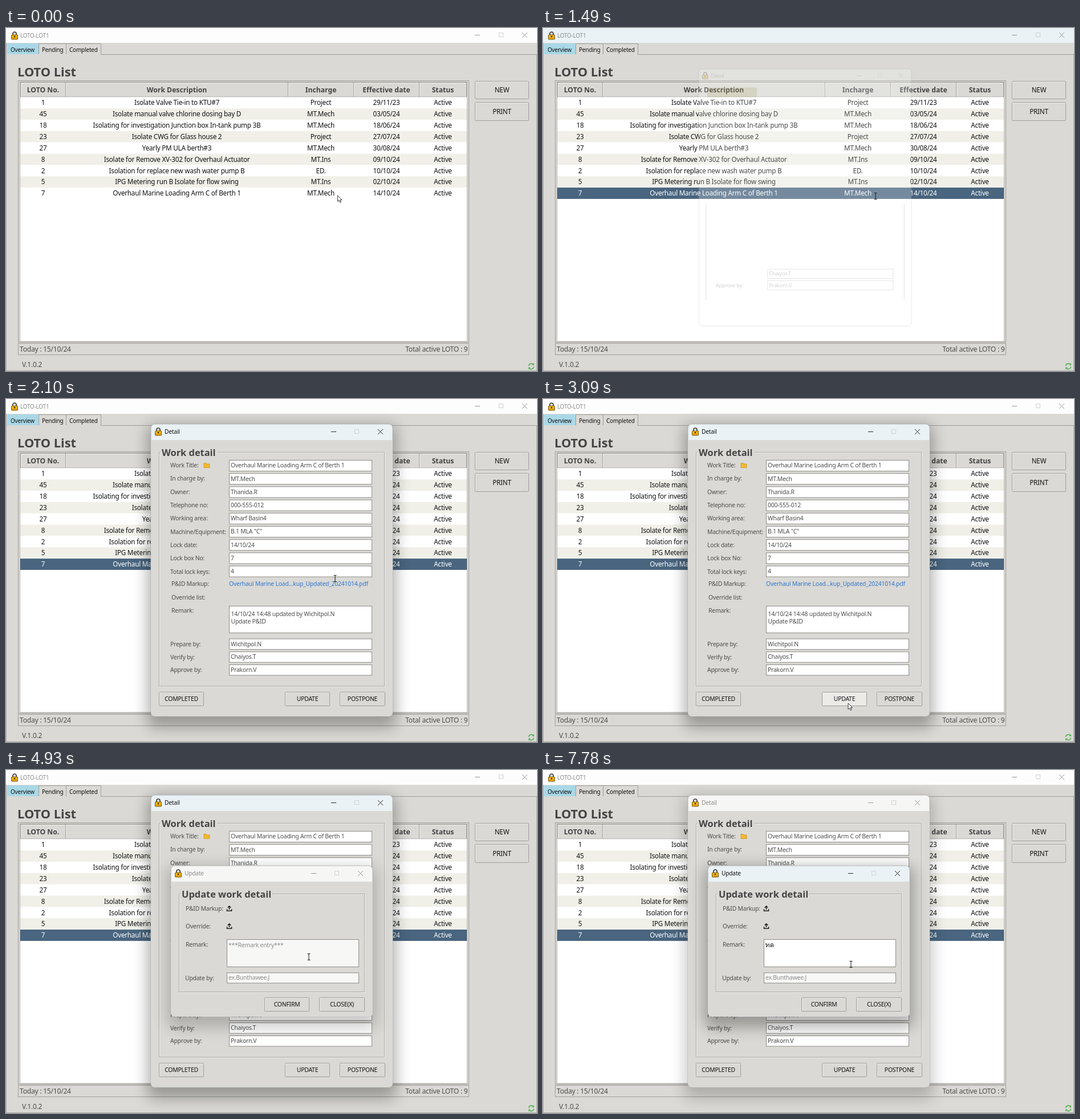
Write an HTML page that moves like this. It is 931 px wide and 602 px high and loops after 8 s.

```html
<!DOCTYPE html>
<html lang="en">
<head>
<meta charset="utf-8">
<title>LOTO list</title>
<style>
html, body { margin: 0; width: 100%; height: 100%; overflow: hidden; background: #dad9d5; }
svg { display: block; width: 931px; height: 602px; }
text { font-family: "Noto Sans", "Open Sans", sans-serif; letter-spacing: -.02em; white-space: pre; }
.bold { font-weight: 700; letter-spacing: 0; }
.mid { text-anchor: middle; }
.end { text-anchor: end; }
.blur { filter: blur(13px); }
</style>
</head>
<body>
<svg id="stage" viewBox="0 0 931 602" xmlns="http://www.w3.org/2000/svg"></svg>
<script>
const FACE = '#dad9d5', EDGE = '#9f9e99', INK = '#111', GREY = '#8c8c8c', BLUE = '#eaf2f6', WHITE = '#fdfdfd', PALE = '#f6f6f5';
const LOOP = 8000, SMALL = 10.4, ROW = 11.7;

const text = (x, y, s, size = SMALL, fill = '#4c4c4c', cls = '') =>
  `<text x="${x}" y="${y}" font-size="${size}" fill="${fill}" class="${cls}">${s.replace(/&/g, '&amp;')}</text>`;
const rect = (x, y, w, h, fill, stroke = 'none', extra = '') =>
  `<rect x="${x}" y="${y}" width="${w}" height="${h}" fill="${fill}" stroke="${stroke}" ${extra}/>`;
const path = (d, stroke, width = 1, extra = '') =>
  `<path d="${d}" fill="none" stroke="${stroke}" stroke-width="${width}" ${extra}/>`;

const button = (x, y, w, h, label, size = SMALL, id = '') =>
  rect(x + .5, y + .5, w - 1, h - 1, FACE, EDGE, `rx="1" ${id && `id="${id}"`}`) +
  path(`M${x + 1.5} ${y + h - 2}V${y + 1.5}H${x + w - 2}`, '#ecebe8') +
  text(x + w / 2, y + h / 2 + size * .37, label, size, INK, 'mid');

const field = (x, y, w, h, value = '', fill = '#fff', ink = '#4c4c4c') =>
  rect(x + .5, y + .5, w - 1, h - 1, fill, '#8d8c88') +
  (value && text(x + 3, y + h / 2 + 3.4, value, SMALL, ink));

const groupBox = (x, y, w, h, title, gap) => {
  const frame = `M${x + 2} ${y}H${x}V${y + h}H${x + w}V${y}H${x + gap}`;
  return path(frame, '#f0efec', 1, 'transform="translate(1 1)"') + path(frame, '#abaaa5') +
    text(x + 4.5, y + 6, title, 16.4, '#444', 'bold');
};

const lock = (x, y) =>
  path(`M${x - 3} ${y}v-3a3 3 0 0 1 6 0v3`, '#3c3a35', 1.7) +
  rect(x - 5.5, y - 1, 11, 8, '#f5b50a', '#4a3a0c', 'stroke-width=".8" rx="1"') +
  rect(x - 5, y + 4, 10, 1.4, '#d98f06') +
  `<circle cx="${x}" cy="${y + 2}" r="1.3" fill="#2d2408"/>`;

const controls = (xMin, xMax, xClose, y, name) =>
  path(`M${xMin} ${y + .5}h9M${xClose} ${y - 4}l9 9m0 -9l-9 9`, GREY, .9, `id="${name}Controls"`) +
  rect(xMax + .5, y - 3.5, 7, 7, 'none', '#cfd3d4');

const upload = (x, y) =>
  path(`M${x} ${y + 2}v-6m-2.7 2.6l2.7 -2.7l2.7 2.7M${x - 4} ${y + 1}v3.2h8v-3.2`, '#222', 1.5);

// Main window
const columns = [[25, 79, 'LOTO No.'], [104, 390, 'Work Description'], [494, 115, 'Incharge'], [609, 115, 'Effective date'], [724, 83, 'Status']];
const jobs = [
  '1|Isolate Valve Tie-in to KTU#7|Project|29/11/23',
  '45|Isolate manual valve chlorine dosing bay D|MT.Mech|03/05/24',
  '18|Isolating for investigation Junction box In-tank pump 3B|MT.Mech|18/06/24',
  '23|Isolate CWG for Glass house 2|Project|27/07/24',
  '27|Yearly PM ULA berth#3|MT.Mech|30/08/24',
  '8|Isolate for Remove XV-302 for Overhaul Actuator|MT.Ins|09/10/24',
  '2|Isolation for replace new wash water pump B|ED.|10/10/24',
  '5|IPG Metering run B Isolate for flow swing|MT.Ins|02/10/24',
  '7|Overhaul Marine Loading Arm C of Berth 1|MT.Mech|14/10/24'
];

const tableRow = (job, i) => {
  const y = 121.3 + i * 19.85, last = i === jobs.length - 1;
  const cells = [...job.split('|'), 'Active'].map((s, c) =>
    text(columns[c][0] + columns[c][1] / 2 + .5, y + 14.1, s, ROW, 'currentColor', 'mid')).join('');
  return `<g ${last ? 'id="pickedRow"' : ''} color="${INK}">` +
    rect(25, y, 783, 19.85, i % 2 ? '#f0f0e9' : '#fff', 'none', last ? 'id="pickedFill"' : '') +
    cells + '</g>';
};

const mainWindow = () =>
  rect(0, 0, 931, 602, FACE) +
  rect(0, 0, 931, 26, WHITE, 'none', 'id="mainBar"') +
  lock(15, 13) + text(25, 17, 'LOTO-LOT1', 9.9, GREY, 'mainTitle') + controls(822, 864, 905, 12, 'main') +
  path('M.5 26V602M930.5 46V602M0 601.5H931', '#aaa9a6') +
  rect(2, 27, 55, 19, '#a9d8e7') +
  path('M57.5 46V27.5H105.5V46M105.5 27.5H166.5V46M166 46.5H931', EDGE) +
  text(8, 41.5, 'Overview', 10, INK) + text(63, 41.5, 'Pending', 10, INK) + text(111, 41.5, 'Completed', 10, INK) +
  text(20, 85, 'LOTO List', 21.8, '#444', 'bold') +
  rect(21.5, 92.5, 790, 459, FACE, EDGE) +
  rect(24.5, 94.5, 784, 455.5, '#fff', '#b5b4af') +
  columns.map(([x, w, name]) =>
    rect(x + .5, 95.5, w, 25.5, FACE, EDGE) + path(`M${x + 1.5} 120V96.5H${x + w - 1}`, '#f1f0ed') +
    text(x + w / 2 + .5, 112.5, name, 12.2, '#444', 'bold mid')).join('') +
  jobs.map(tableRow).join('') +
  rect(21.5, 553.5, 790, 20, FACE, EDGE) +
  text(24, 568, 'Today : 15/10/24', 12.1) + text(809.5, 568, 'Total active LOTO : 9', 12.1, '#4c4c4c', 'end') +
  text(28, 595, 'V.1.0.2', 12) +
  button(822, 93, 95, 32, 'NEW', ROW) + button(822, 130, 95, 33, 'PRINT', ROW) +
  path('M916.5 593a4.6 4.6 0 0 1 8 -2.5M925.5 594.5a4.6 4.6 0 0 1 -8 2.5', '#58b559', 1.7) +
  '<path d="M926 588v4h-4zM916 599.5v-4h4z" fill="#58b559"/>';

// Dialog shell: shadow, title bar, body, plus a blank version used while opening
const dialog = (name, title, x, y, w, h, content, blank) => {
  const head = (key, ink) => lock(x + 13, y + 13) + text(x + 24, y + 17.3, title, 10.2, ink, key + 'Title') +
    controls(x + w - 108, x + w - 67, x + w - 26, y + 13, key);
  return `<g id="${name}">
    <g id="${name}Full">
      ${rect(x - 6, y + 2, w + 12, h + 17, '#000', 'none', `rx="12" class="blur" id="${name}Shadow"`)}
      ${rect(x, y, w, h, PALE, '#aaa9a5', `rx="7" stroke-width=".8" id="${name}Bar"`)}
      <path d="M${x + .4} ${y + 28}h${w - .8}v${h - 35}q0 6.6 -6.6 6.6h${14 - w}q-6.6 0 -6.6 -6.6z" fill="${FACE}"/>
      ${head(name, INK)}${content}
    </g>
    <g id="${name}Blank" opacity=".24">
      ${rect(x, y, w, h, '#fff', '#999', 'rx="7"')}${head(name + 'Pre', GREY)}${blank}
    </g></g>`;
};

const details = [
  ['Work Title:', 'Overhaul Marine Loading Arm C of Berth 1'], ['In charge by:', 'MT.Mech'], ['Owner:', 'Thanida.R'],
  ['Telephone no:', '000-555-012'], ['Working area:', 'Wharf Basin4'], ['Machine/Equipment:', 'B.1 MLA "C"'],
  ['Lock date:', '14/10/24'], ['Lock box No:', '7'], ['Total lock keys:', '4']
];
const signers = [['Prepare by:', 'Wichitpol.N'], ['Verify by:', 'Chaiyos.T'], ['Approve by:', 'Prakorn.V']];
const signRow = ([label, value], i) =>
  text(288, 434 + i * 22.7, label) + field(391, 420.5 + i * 22.7, 251, 19.5, value);

const detailContent =
  groupBox(268.5, 93.5, 395, 410.5, 'Work detail', 102) +
  details.map(([label, value], i) =>
    text(288, 120 + i * 23.35, label) + field(391, 107 + i * 23.2, 251, 20, value)).join('') +
  '<path d="M347 112.5h4l1 1.5h5v6.5h-10z" fill="#f2b92c" stroke="#c98d12" stroke-width=".7"/>' +
  text(290, 328, 'P&ID Markup:') + text(391, 328, 'Overhaul Marine Load...kup_Updated_20241014.pdf', SMALL, '#2f76cf') +
  text(290, 352, 'Override list:') + text(290, 375, 'Remark:') +
  field(391, 363, 251, 48) + text(394.5, 380.5, '14/10/24 14:48 updated by Wichitpol.N') + text(394.5, 393.5, 'Update P&ID') +
  signers.map(signRow).join('') +
  button(268, 514, 79, 25, 'COMPLETED') + button(489, 514, 79, 25, 'UPDATE', SMALL, 'updateButton') + button(585, 514, 80, 25, 'POSTPONE');

const detailBlank =
  rect(271, 81, 99, 19, '#c9c184') + path('M268.5 314V504M663.5 314V504', '#777') +
  field(391, 443, 251, 19.5, signers[1][1]) + signRow(signers[2], 2);

const updateContent =
  groupBox(303.5, 217.5, 325, 172, 'Update work detail', 163) +
  text(315, 247, 'P&ID Markup:') + upload(391.5, 243) +
  text(315, 278, 'Override:') + upload(391.5, 274) +
  text(315, 309.5, 'Remark:') + text(314, 369, 'Update by:') +
  rect(387.5, 297.5, 231, 48, '#f7f7f6', '#8d8c88', 'id="remarkBox"') +
  text(390, 310.5, '***Remark entry***', SMALL, GREY, 'hint') +
  `<text id="typed" x="390" y="310.5" font-size="${SMALL}" fill="${INK}"></text>` +
  path('M390.5 300.5V313', INK, 1, 'id="caret"') +
  path('M392 305.4a.8 .8 0 1 0 -.8 .8M392 305V311L394.6 306Q396.4 303.6 396.4 306.4V311', INK, 1, 'id="thaiA"') +
  path('M399.4 311V307.4Q399.2 304.4 401.4 304.4Q403.5 304.4 403.5 307V311M399.6 311L401 309a.8 .8 0 1 0 -.8 -.8', INK, 1, 'id="thaiB"') +
  field(387, 355.5, 232, 19, 'ex.Bunthawee.J', '#f7f7f6', GREY) +
  button(453, 399, 79, 25, 'CONFIRM') + button(549, 399, 80, 25, 'CLOSE(X)');

const stage = document.getElementById('stage');
stage.innerHTML = mainWindow() +
  dialog('detail', 'Detail', 254, 44, 424, 513, detailContent, detailBlank) +
  dialog('update', 'Update', 289, 168, 354, 265, updateContent, '') +
  '<path id="arrow" d="M0 0V10.5L2.5 8.3L4.3 12.3L6 11.5L4.3 7.7H7.6Z" fill="#fff" stroke="#222" stroke-width=".9"/>' +
  '<path id="beam" d="M-2.5 -5.5H2.5M0 -5.5V5.5M-2.5 5.5H2.5" fill="none" stroke="#222" stroke-width="1.1"/>';

// Timelines: [start in ms, value...]
const pointer = [
  [0, 'arrow', 581.5, 294], [1490, 'beam', 583, 295], [2100, 'beam', 577, 315], [2220, 'beam', 564, 356],
  [2340, 'beam', 551, 400], [2460, 'beam', 544, 425], [2710, 'beam', 544, 429], [2830, 'arrow', 543, 429],
  [2970, 'arrow', 538, 502], [3090, 'arrow', 535, 534], [4450, 'arrow', 535, 496], [4570, 'arrow', 533, 418],
  [4690, 'beam', 531, 340], [4810, 'beam', 531, 330], [4930, 'beam', 531, 328], [5050, 'beam', 535, 333], [5170, 'beam', 540, 341]
];
const titles = {
  main: [[0, WHITE, GREY], [1000, WHITE, INK], [1240, BLUE, INK], [1490, BLUE, GREY], [1610, WHITE, GREY]],
  detail: [[0, WHITE, INK], [1730, BLUE, INK], [5290, PALE, GREY]],
  update: [[0, PALE, GREY], [5290, WHITE, INK], [5410, BLUE, INK]]
};
const opening = {
  detail: [[0, 'off'], [1490, 'blank', .88], [1610, 'full', .993], [1730, 'full', 1]],
  update: [[0, 'off'], [4090, 'blank', .88], [4210, 'full', .986], [4330, 'full', 1]]
};
const hover = [[0, FACE], [2970, '#ecebe8'], [4570, FACE]];
const typing = [[0, ''], [5290, '|'], [6030, ''], [6280, 'm'], [6400, 'mf'], [6900, 'm'], [7020, '|'], [7140, ''], [7660, 'A'], [7780, 'AB']];

const at = (track, t) => track.findLast(step => step[0] <= t).slice(1);
const el = id => document.getElementById(id);
const set = (node, name, value) => node.setAttribute(name, value);
const show = (node, on) => set(node, 'visibility', on ? 'visible' : 'hidden');
const display = (id, on) => { el(id).style.display = on ? '' : 'none'; };

function draw(t) {
  for (const name in titles) {
    const [bar, ink] = at(titles[name], t);
    set(el(name + 'Bar'), 'fill', bar);
    set(stage.querySelector(`.${name}Title`), 'fill', ink);
    set(el(name + 'Controls'), 'stroke', ink);
  }
  const picked = t >= 1000;
  set(el('pickedRow'), 'color', picked ? '#fff' : INK);
  set(el('pickedFill'), 'fill', picked ? '#49657f' : '#fff');

  for (const name in opening) {
    const [phase, scale = 1] = at(opening[name], t);
    display(name + 'Full', phase === 'full');
    display(name + 'Blank', phase === 'blank');
    const [dx, dy] = phase === 'blank' ? [-6.5, -3] : [0, 0];
    set(el(name), 'transform', `translate(${466 + dx} ${300.5 + dy}) scale(${scale}) translate(-466 -300.5)`);
  }
  const focused = t >= 5290;
  set(el('detailShadow'), 'opacity', focused ? .2 : .3);
  set(el('updateShadow'), 'opacity', focused ? .3 : .2);
  set(el('updateButton'), 'fill', at(hover, t)[0]);

  set(el('remarkBox'), 'fill', focused ? '#fff' : '#f7f7f6');
  show(stage.querySelector('.hint'), !focused);
  const [entry] = at(typing, t);
  el('typed').textContent = entry.startsWith('m') ? entry : '';
  show(el('caret'), entry === '|');
  show(el('thaiA'), entry.includes('A'));
  show(el('thaiB'), entry.includes('B'));

  const [shape, x, y] = at(pointer, t);
  for (const id of ['arrow', 'beam']) {
    show(el(id), id === shape);
    set(el(id), 'transform', `translate(${x} ${y})`);
  }
}

const start = performance.now();
function tick() {
  draw((performance.now() - start) % LOOP);
  requestAnimationFrame(tick);
}
tick();
</script>
</body>
</html>
```
